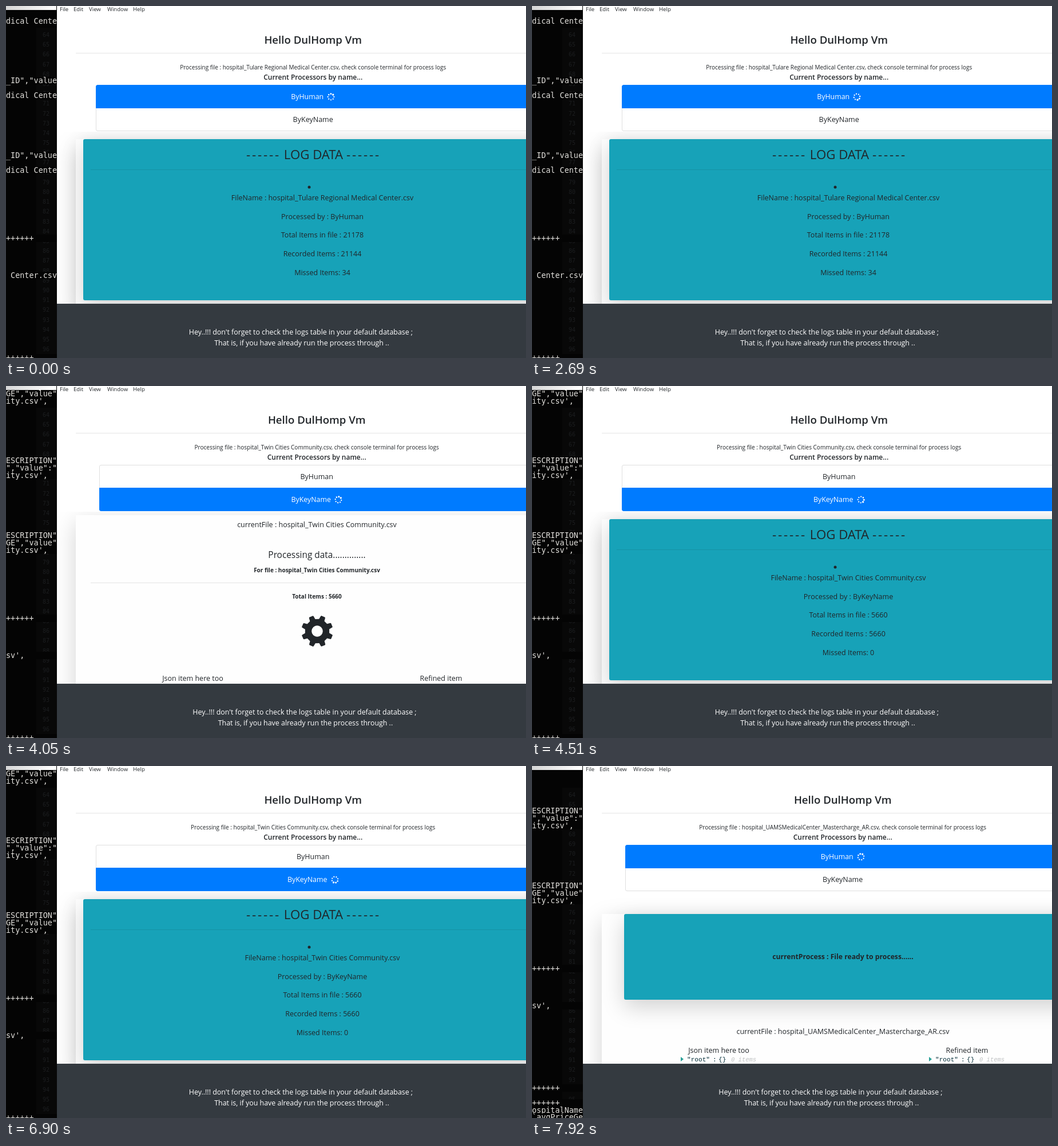
An HTML page for the animation above (8 s loop, 909 by 616 pixels).

```html
<!DOCTYPE html>
<html lang="en">
<head>
<meta charset="utf-8">
<title>File processor</title>
<style>
  html, body { margin: 0; width: 100%; height: 100%; overflow: hidden; background: #fff; }
  #stage { position: absolute; left: 0; top: 0; width: 909px; height: 616px; overflow: hidden;
           font-family: "Open Sans", "Noto Sans", sans-serif; color: #212529; }
  #stage div { position: absolute; box-sizing: border-box; white-space: pre; }
  #terminal { left: 0; top: 0; width: 89px; height: 616px; background: #040404; overflow: hidden; }
  #gutter { left: 53px; top: 38px; width: 36px; height: 578px; background: #080808; }
  #titlebar { left: 0; top: 0; width: 88px; height: 7px; background: linear-gradient(90deg, #d6d6d6, #fff); }
  #terminal .number { left: 64px; height: 14px; font: 10px/14px "DejaVu Sans Mono", monospace; color: #1c1e20; }
  #terminal .row { left: 0; width: 89px; height: 13px; background: #040404; color: #e2e0dc;
                   font: 13.45px/13px "DejaVu Sans Mono", monospace; }
  #scroll { left: 89px; top: 220px; width: 820px; height: 301px; overflow: hidden; }
  #content { left: -89px; top: -220px; width: 909px; height: 616px; }
  #footer { left: 89px; top: 521px; width: 820px; height: 95px; background: #343a40; }
  .text { width: 900px; height: 30px; line-height: 30px; text-align: center; }
  .rule { width: 909px; height: 1px; background: rgba(0, 0, 0, .1); }
  .box { width: 830px; box-shadow: 0 13px 39px rgba(0, 0, 0, .175); }
  .item { width: 820px; border: 1px solid #dfdfdf; }
  .mono { font-family: "Liberation Mono", monospace; color: #002b36; }
  .note { font-style: italic; color: #bfc1c2; }
  .dashes { letter-spacing: .13em; }
  svg { position: absolute; overflow: visible; }
</style>
</head>
<body>
<div id="stage">
  <div id="terminal"></div>
  <div id="page"></div>
  <div id="scroll"><div id="content"></div></div>
  <div id="footer"></div>
  <div id="notice"></div>
</div>
<script>
const LOOP = 8000;
const SPIN = 2000;
const TEAL = '#17a2b8';
const PAPER = '#fefefe';
const byId = id => document.getElementById(id);

const tulare = 'hospital_Tulare Regional Medical Center.csv';
const twin = 'hospital_Twin Cities Community.csv';
const uams = 'hospital_UAMSMedicalCenter_Mastercharge_AR.csv';

const scenes = [
  { start: 0, view: 'log', file: tulare, active: 0, total: 21178, recorded: 21144, shell: 'id' },
  { start: 3000, view: 'ready', file: twin, active: 1, shell: 'id' },
  { start: 3740, view: 'work', file: twin, active: 1, total: 5660, shell: 'description' },
  { start: 4220, view: 'log', file: twin, active: 1, total: 5660, recorded: 5660, shell: 'description' },
  { start: 7300, view: 'ready', file: uams, active: 0, shell: 'description' }
];

const shells = {
  id: [[27, 'dical Cente'], [131, '_ID","value'], [157, 'dical Cente'], [262, '_ID","value'],
       [288, 'dical Cente'], [407, '++++++'], [472, ' Center.csv'], [616, '++++++']],
  description: [[14, 'GE","value"'], [27, "ity.csv',"], [131, 'ESCRIPTION"'], [144, '","value":"'],
       [157, "ity.csv',"], [262, 'ESCRIPTION"'], [275, 'GE","value"'], [288, "ity.csv',"],
       [407, '++++++'], [472, "sv',"], [616, '++++++']]
};
const newRows = [[590, '++++++'], [603, 'ospitalName'], [615, '`avgPriceGe']];

const text = (x, y, size, content, weight = 400, color = 'inherit') =>
  `<div class="text" style="left:${x - 450}px;top:${y - 15}px;font-size:${size}px;font-weight:${weight};color:${color}">${content}</div>`;
const leftText = (x, y, size, content, kind = '') =>
  `<div class="${kind}" style="left:${x}px;top:${y - 7}px;font-size:${size}px;line-height:14px">${content}</div>`;
const rule = (x, y) => `<div class="rule" style="left:${x}px;top:${y}px"></div>`;
const box = (x, y, height, color, radius = 0) =>
  `<div class="box" style="left:${x}px;top:${y}px;height:${height}px;background:${color};border-radius:${radius}px"></div>`;
const svg = (x, y, shape) =>
  `<svg style="left:${x}px;top:${y}px" width="1" height="1">${shape}</svg>`;

const polar = (radius, degrees) => {
  const a = degrees * Math.PI / 180;
  return [radius * Math.sin(a), -radius * Math.cos(a)];
};

// Eight dots; the three leading ones grow clockwise.
function spinner(x, y) {
  let dots = '';
  for (let i = 0; i < 8; i++) {
    const [cx, cy] = polar(5.3, i * 45 + 90);
    const radius = 1.15 + 0.17 * Math.max(0, i - 4);
    dots += `<circle cx="${cx}" cy="${cy}" r="${radius}"/>`;
  }
  return svg(x, y, `<g class="spin" data-offset="0" fill="#fff">${dots}</g>`);
}

function gear(x, y) {
  const points = [];
  for (let i = 0; i < 8; i++) {
    for (const [radius, angle] of [[21.4, -13.5], [27, -9], [27.9, -7], [27.9, 7], [27, 9], [21.4, 13.5]])
      points.push(polar(radius, i * 45 + angle));
  }
  const hole = 'M9.8 0A9.8 9.8 0 1 0 -9.8 0A9.8 9.8 0 1 0 9.8 0Z';
  return svg(x, y, `<path class="spin" data-offset="13" fill="#212529" fill-rule="evenodd" d="M${points.join('L')}Z${hole}"/>`);
}

function terminal({ view, shell }) {
  let html = '<div id="gutter"></div>';
  for (let n = 64; n <= 96; n++)
    html += `<div class="number" style="top:${44 + (n - 64) * 17.19}px">${n}</div>`;
  const shift = view === 'ready' ? 52 : 0;
  const rows = shells[shell].map(([y, s]) => [y - shift, s]).filter(([y]) => y > 8);
  if (shift) rows.push(...newRows);
  for (const [y, s] of rows) html += `<div class="row" style="top:${y - 7}px">${s}</div>`;
  return html + '<div id="titlebar"></div>';
}

function page({ file, active }, dx) {
  const menu = [[94, 'File'], [118, 'Edit'], [145, 'View'], [177, 'Window'], [222, 'Help']];
  const center = 536.7 + dx;
  let html = menu.map(([x, s]) => leftText(x, 5.5, 9.6, s)).join('');
  html += text(center, 59, 18.6, 'Hello DulHomp Vm', 600) + rule(122, 82);
  html += text(center, 107, 10, `Processing file : ${file}, check console terminal for process logs`);
  html += text(center, 125, 12, 'Current Processors by name...', 600);
  ['ByHuman', 'ByKeyName'].forEach((name, i) => {
    const on = i === active;
    const y = 159 + i * 40;
    const radius = i ? '0 0 0 3px' : '3px 0 0 0';
    const fill = on ? 'background:#007bff;border-color:#007bff' : 'background:#fff';
    html += `<div class="item" style="left:${156.6 + dx}px;top:${y - 21}px;height:41px;border-radius:${radius};${fill};z-index:${+on}"></div>`;
    const label = on
      ? text(center - 10, y, 12.4, name, 500, '#fff') + spinner((i ? 574.5 : 568) + dx, y - .3)
      : text(center, y, 12.5, name);
    html += `<div style="z-index:2">${label}</div>`;
  });
  return html;
}

const treeRow = x =>
  svg(x, 513, '<path d="M0 -4L5 0L0 4Z" fill="#2aa198"/>') +
  leftText(x + 11, 514, 11.1, '"root"', 'mono') +
  leftText(x + 56, 514, 11.1, ':', 'mono') +
  leftText(x + 66, 514, 11.1, '{}', 'mono') +
  leftText(x + 88, 514, 10.5, '0 items', 'mono note');

const columns = y => text(326.5, y, 12.5, 'Json item here too') + text(760.5, y, 12.5, 'Refined item');

const views = {
  log({ file, active, total, recorded }) {
    const lines = [`FileName : ${file}`, `Processed by : ${active ? 'ByKeyName' : 'ByHuman'}`,
      `Total Items in file : ${total}`, `Recorded Items : ${recorded}`, `Missed Items: ${total - recorded}`];
    const dashes = '<span class="dashes">------</span>';
    return box(122, 233, 400, PAPER) + box(135, 233, 282, TEAL, 3) +
      text(537.5, 260, 22.2, `${dashes} LOG DATA ${dashes}`, 500) + rule(148, 286) +
      svg(529.5, 317, '<circle r="2.5" fill="#212529"/>') +
      lines.map((s, i) => text(553, 336 + i * 32.7, 12.5, s)).join('');
  },
  ready({ file }) {
    return box(122, 259, 400, PAPER) + box(161, 259, 150, TEAL, 3) +
      text(543.5, 334, 12.2, 'currentProcess : File ready to process......', 700) +
      text(543.5, 465, 12.5, `currentFile : ${file}`) + columns(498) + treeRow(260) + treeRow(694);
  },
  work({ file, total }) {
    return box(122, 226, 400, PAPER) + text(543.5, 242.5, 12.5, `currentFile : ${file}`) +
      text(543.5, 295.5, 15.4, 'Processing data..............', 500) +
      text(543.5, 322, 10, `For file : ${file}`, 700) + rule(148, 344) +
      text(543.5, 368, 10, `Total Items : ${total}`, 700) + gear(543.5, 429.3) + columns(512);
  }
};

function show(scene) {
  // The page is narrower while the log makes it scroll.
  const dx = scene.view === 'log' ? 0 : 6.5;
  byId('terminal').innerHTML = terminal(scene);
  byId('page').innerHTML = page(scene, dx);
  byId('content').innerHTML = views[scene.view](scene);
  byId('notice').innerHTML =
    text(515.5 + dx, 571, 12.4, "Hey..!!! don't forget to check the logs table in your default database ;", 500, '#fff') +
    text(517 + dx, 590, 12.4, 'That is, if you have already run the process through ..', 500, '#fff');
}

let current;
function draw() {
  const time = performance.now() % LOOP;
  const scene = scenes.findLast(s => time >= s.start);
  if (scene !== current) show(current = scene);
  for (const shape of document.querySelectorAll('.spin'))
    shape.setAttribute('transform', `rotate(${time / SPIN * 360 + +shape.dataset.offset})`);
  requestAnimationFrame(draw);
}
draw();
</script>
</body>
</html>
```
